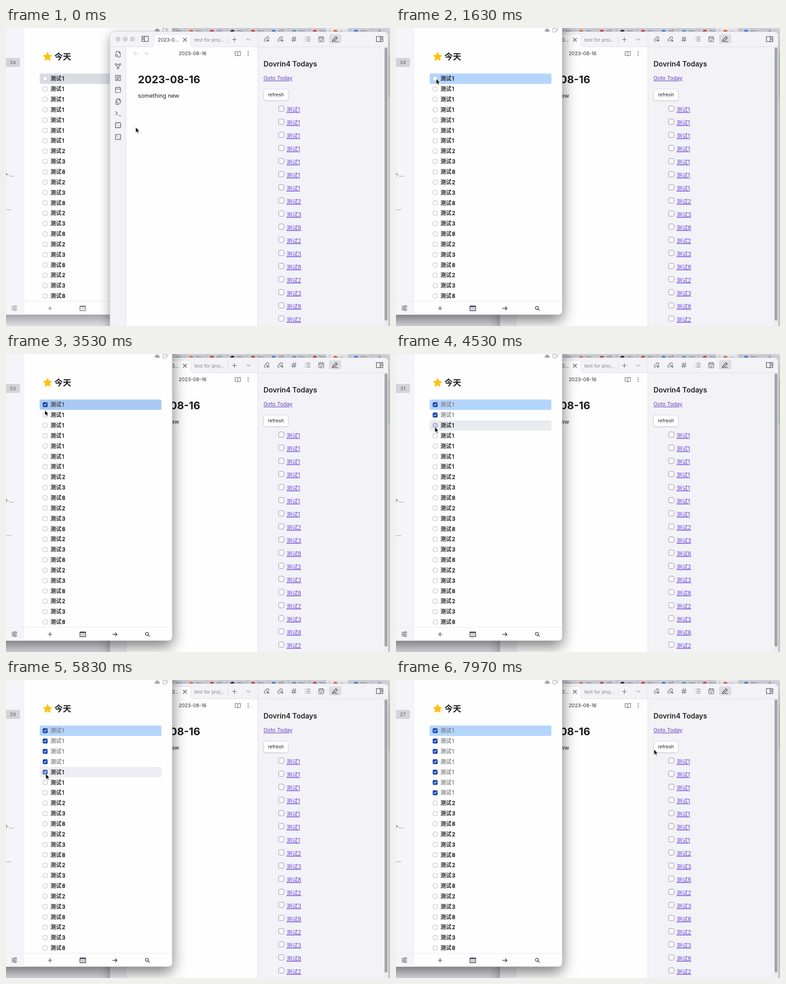
An HTML page that plays this animation: 850 px wide and 658 px high, repeating every 8 s.

```html
<!DOCTYPE html>
<html lang="zh">
<head>
<meta charset="utf-8">
<title>Todo sync</title>
<style>
html, body { margin: 0; width: 100%; height: 100%; overflow: hidden; background: #e3e3ea; }
svg { display: block; width: 850px; height: 658px; font-family: Inter, "Noto Sans CJK SC", "Noto Sans CJK", sans-serif; }
.icon { fill: none; stroke-linecap: round; stroke-linejoin: round; }
#notes .frame { filter: drop-shadow(0 7px 12px rgba(0,0,0,.34)); }
#tasks .frame { filter: drop-shadow(0 9px 12px rgba(0,0,0,.36)); }
#tasks.front .frame { filter: drop-shadow(0 12px 16px rgba(0,0,0,.52)); }
#tasks .tools { color: #77777c; }
#tasks.front .tools { color: #34344a; }
.label { stroke: currentColor; stroke-width: .3px; }
</style>
</head>
<body>
<svg viewBox="0 0 850 658">
  <g id="desktop"></g>
  <g id="windows"><g id="tasks"></g><g id="notes"></g></g>
  <path id="cursor" d="M0 0V12.2L2.8 9.6 4.7 14 6.7 13.1 4.8 8.9H8.6Z" fill="#111" stroke="#fff" stroke-width=".8"/>
</svg>
<script>
const LOOP = 8000, ACTIVATE = 1150;
const $ = id => document.getElementById(id);
const clamp = v => Math.max(0, Math.min(1, v));

const rect = (x, y, w, h, fill, r = 0, extra = '') =>
  `<rect x="${x}" y="${y}" width="${w}" height="${h}" rx="${r}" fill="${fill}" ${extra}/>`;
const text = (x, y, size, s, fill = '#222', weight = 400, extra = '') =>
  `<text x="${x}" y="${y}" font-size="${size}" fill="${fill}" font-weight="${weight}" ${extra}>${s}</text>`;
// Icons are drawn in a 24-unit box centred on (x, y).
const icon = (x, y, d, size = 15, color = '#5c5c62', width = 1.8) =>
  `<path class="icon" d="${d}" stroke="${color}" stroke-width="${width}" transform="translate(${x - size / 2} ${y - size / 2}) scale(${size / 24})"/>`;
const line = (x1, y1, x2, y2, color = '#dedee6') =>
  `<path d="M${x1} ${y1}L${x2} ${y2}" stroke="${color}"/>`;

const I = {
  plus: 'M12 4V20M4 12H20',
  close: 'M5 5L19 19M19 5L5 19',
  chevron: 'M5 9L12 16 19 9',
  left: 'M21 12H3M10 5L3 12 10 19',
  right: 'M3 12H21M14 5L21 12 14 19',
  search: 'M16 10A6 6 0 1 1 4 10A6 6 0 1 1 16 10M15 15L21 21',
  panelLeft: 'M3 4H21Q22 4 22 5V19Q22 20 21 20H3Q2 20 2 19V5Q2 4 3 4M10 4V20M5 8H7M5 11H7M5 14H7',
  panelRight: 'M3 4H21Q22 4 22 5V19Q22 20 21 20H3Q2 20 2 19V5Q2 4 3 4M14 4V20M17 8H19M17 11H19M17 14H19',
  file: 'M5 9V4Q5 2 7 2H15L20 7V20Q20 22 18 22H13M15 2V7H20M10 16A3.5 3.5 0 1 1 3 16A3.5 3.5 0 1 1 10 16M9 19L12 22',
  branch: 'M8 6A3 3 0 1 1 2 6A3 3 0 1 1 8 6M22 6A3 3 0 1 1 16 6A3 3 0 1 1 22 6M15 19A3 3 0 1 1 9 19A3 3 0 1 1 15 19M6 9L11 16M18 9L13 16M8 6H16',
  grid: 'M3 3H10V12H3ZM14 3H21V8H14ZM14 12H21V21H14ZM3 16H10V21H3Z',
  calendar: 'M5 4H19Q21 4 21 6V20Q21 22 19 22H5Q3 22 3 20V6Q3 4 5 4M3 10H21M8 2V6M16 2V6',
  copy: 'M9 2H16L21 7V16Q21 17 20 17H9Q8 17 8 16V3Q8 2 9 2M15 2V8H21M4 7V21Q4 22 5 22H16',
  prompt: 'M3 5L10 12 3 18M13 20H22',
  dice: 'M5 3H19Q21 3 21 5V19Q21 21 19 21H5Q3 21 3 19V5Q3 3 5 3M8 8h.1M12 12h.1M16 16h.1',
  book: 'M12 6Q10 4 2 4V19Q10 19 12 21 14 19 22 19V4Q14 4 12 6V20',
  dots: 'M12 4v.2M12 12v.2M12 20v.2',
  linkIn: 'M9 15A5 5 0 0 0 16 14L19 11A5 5 0 0 0 12 4L10 6M13 9A5 5 0 0 0 7 10L4 13A5 5 0 0 0 8 21M22 18H14M17 15L14 18 17 21',
  linkOut: 'M9 15A5 5 0 0 0 16 14L19 11A5 5 0 0 0 12 4L10 6M13 9A5 5 0 0 0 7 10L4 13A5 5 0 0 0 8 21M14 18H22M19 15L22 18 19 21',
  hash: 'M4 9H21M3 16H20M10 2L7 22M17 2L14 22',
  list: 'M8 5H22M8 12H22M8 19H22M2 5h.2M2 12h.2M2 19h.2',
  pencil: 'M12 21H22M16 3L21 8 8 20 3 21 4 16Z',
  sliders: 'M2 5H13M19 5H22M2 12H5M11 12H22M2 19H12M18 19H22M19 5A3 3 0 1 1 13 5A3 3 0 1 1 19 5M11 12A3 3 0 1 1 5 12A3 3 0 1 1 11 12M18 19A3 3 0 1 1 12 19A3 3 0 1 1 18 19',
  dates: 'M3 3H21Q23 3 23 5V20Q23 21 22 21H2Q1 21 1 20V5Q1 3 3 3M1 6H23M6 12h.2M10 12h.2M14 12h.2M18 12h.2M6 16h.2M10 16h.2M14 16h.2M18 16h.2',
  tick: 'M5 12L10 17 19 6'
};

const digits = n => Array.from({ length: n }, (_, i) => i < 7 ? 1 : [2, 3, 8][(i - 7) % 3]);
const rowY = i => 112 + 22.85 * i;

function drawDesktop() {
  const dots = ['#e8793c', '#d93a30', '#222', '#d93a30', '#3b82d6', '#5d9fc4', '#d93a30', '#e8632c', '#3478e0'];
  let s = rect(0, 0, 850, 658, '#e3e3ea') + rect(368, 0, 482, 12, '#d7d7e2') + rect(709, 0, 48, 12, '#f2f2f6');
  s += text(376, 11, 10, 'inv', '#77777f');
  dots.forEach((c, i) => {
    const x = 410 + 45.6 * i;
    s += `<circle cx="${x}" cy="9" r="5" fill="${c}"/>` + line(x - 13, 1, x - 13, 8, '#b9b9c3')
      + text(x + 10, 11, 10, i === 7 ? '×' : ['inv', 'gif', 'my'][i % 3], '#77777f');
  });
  s += line(810, 1, 810, 8, '#b9b9c3') + icon(827, 8, I.plus, 13, '#444');
  $('desktop').innerHTML = s + rect(846, 57, 4, 97, '#c5ddd5');
}

function drawNotes() {
  const shell = 'M230 720V18Q230 8 240 8H836Q846 8 846 18V720Z';
  let s = `<path class="frame" d="${shell}" fill="#f2f2f7" stroke="#c9c9d0" stroke-width=".7"/>`;
  s += rect(266, 42, 291, 618, '#fefefe') + line(230, 41.5, 846, 41.5) + line(265.5, 42, 265.5, 658, '#dcdcf0')
    + line(557.5, 8, 557.5, 658);
  for (const x of [248, 264, 280]) s += `<circle cx="${x}" cy="24.5" r="5" fill="#d3d3d6" stroke="#bfbfc4" stroke-width=".7"/>`;
  s += icon(308, 24, I.panelLeft, 17, '#4c4c52');
  s += `<path d="M323 42Q328 42 328 37V19Q328 14 333 14H404Q409 14 409 19V37Q409 42 414 42Z" fill="#fefefe" stroke="#dedee6" stroke-width=".8"/>`
    + rect(324, 41, 89, 3, '#fefefe');
  s += text(336, 30, 10.5, '2023-0...', '#333') + icon(396, 26, I.close, 12, '#333', 2.4)
    + text(417, 30, 10.5, 'test for proj...', '#888') + line(491.5, 18, 491.5, 34, '#d0d0d6')
    + icon(505.5, 25.5, I.plus, 14) + icon(536.5, 25, I.chevron, 13);

  [I.file, I.branch, I.grid, I.calendar, I.copy, I.prompt, I.dice, I.dice]
    .forEach((d, i) => s += icon(248, 58 + 26.1 * i, d, 15, '#55555b', d === I.dice ? 2.2 : 1.8));
  s += icon(287.5, 56, I.left, 12, '#b9b9be') + icon(310, 56, I.right, 12, '#b9b9be')
    + text(413, 60, 10.9, '2023-08-16', '#333', 400, 'text-anchor="middle"')
    + icon(513, 56.5, I.book, 14) + icon(536, 56.5, I.dots, 12, '#44444a', 4);
  s += text(292, 121.7, 23.3, '2023-08-16', '#1b1b1d', 700) + text(292, 153.5, 12.7, 'something new');

  s += rect(715, 14, 27, 20, '#dcdce3', 4);
  [I.linkIn, I.linkOut, I.hash, I.list, I.calendar + 'M8 16L11 19 16 14', I.pencil]
    .forEach((d, i) => s += icon(577 + 30.2 * i, 24.5, d, 14.5, i === 5 ? '#222' : '#5c5c62'));
  s += icon(827, 24.5, I.panelRight, 17, '#4c4c52');

  const link = 'text-decoration="underline"', purple = '#7047d8';
  s += text(570, 85, 15.6, 'Dovrin4 Todays', '#222', 600) + text(570, 115.3, 11.8, 'Goto Today', '#6840bd', 400, link);
  s += rect(570.5, 135, 54, 25, '#fff', 4, 'stroke="#d5d5dd" style="filter:drop-shadow(0 1px 1px rgba(0,0,0,.12))"')
    + text(597.5, 151.3, 10.5, 'refresh', '#222', 400, 'text-anchor="middle"');
  digits(17).forEach((digit, i) => {
    const y = 180 + 28.97 * i;
    s += rect(603.5, y - 8, 12, 12, '#f8f8fc', 3, 'stroke="#8d8d98"') + text(621, y + 5, 12.4, '测试' + digit, purple, 400, link);
  });
  s += rect(837, 42, 9, 616, '#ececf1') + rect(838, 43, 6.5, 603, '#a5a5a9', 3);
  $('notes').innerHTML = s;
}

function drawTasks() {
  const shell = 'M-60 -40H368V624Q368 633 359 633H-60Z';
  let s = `<path class="frame" d="${shell}" fill="#fefefe" stroke="#b9b9c0" stroke-width=".7"/>` + rect(-1, 0, 42, 633, '#f4f4f9');
  s += rect(-4, 66, 35, 20, '#d3d3d9', 4) + text(15, 80, 11, '', '#74747a', 500, 'id="count" text-anchor="middle"');
  s += text(-5, 328, 12, '卜...', '#444') + text(1, 402, 12, '...', '#444');
  s += `<path d="M92 54L94.8 60 101 60.7 96.4 65 97.7 71.2 92 68.1 86.3 71.2 87.6 65 83 60.7 89.2 60Z" fill="#ffc10a" stroke="#ffc10a" stroke-width="1.6" stroke-linejoin="round"/>`
    + text(107, 70, 18.7, '今天', '#1f2226', 700);
  s += `<path d="M331 8.5a3 3 0 0 1 0-5.5a4 4 0 0 1 7 0a3 3 0 0 1 1 5.5z" fill="#a9a9b2"/>`
    + rect(350, -3, 8, 9, 'none', 2, 'stroke="#9a9aa2"') + rect(347, 1, 8, 8, '#fefefe', 2, 'stroke="#9a9aa2"');
  s += rect(74.5, 100.5, 269.5, 23, '#dadce4', 3.5, 'id="selected"');
  digits(22).forEach((digit, i) => {
    const y = rowY(i);
    s += `<g class="row">` + rect(74.5, y - 11.3, 269.5, 22.6, '#33337a', 3.5, 'class="press" opacity="0"')
      + rect(82, y - 4.8, 9.4, 9.4, '#fff', 2.5, 'class="box" stroke="#b3b3bb"')
      + `<g class="check" opacity="0">` + rect(81.3, y - 5.5, 10.8, 10.8, '#1747ac', 2.5) + icon(86.7, y, I.tick, 9, '#fff', 3.2) + `</g>`
      + text(98.5, y + 4.3, 12, `测试<tspan dx="1.2">${digit}</tspan>`, 'currentColor', 500, 'class="label" color="#18181b"') + `</g>`;
  });
  s += line(0, 603.5, 368, 603.5, '#eaeaee') + `<g class="tools">` + icon(18.5, 618.5, I.sliders, 14, 'currentColor', 1.6)
    + icon(97.5, 619, I.plus, 13, 'currentColor', 2.2) + icon(170, 619, I.dates, 14, 'currentColor', 2.2)
    + icon(241, 619, I.right, 13, 'currentColor', 2.4) + icon(313, 619, I.search, 13, 'currentColor', 2.6) + `</g>`;
  $('tasks').innerHTML = s;
}

drawDesktop();
drawNotes();
drawTasks();

const presses = [3360, 3850, 4430, 5080, 5690, 6270, 6850];
const path = [
  [0, 287, 219], [250, 287, 219], [1150, 89, 112], [3390, 89, 112], [3530, 86, 124], [3720, 86, 137],
  [4080, 86, 137], [4360, 86, 161], [4580, 86, 161], [4880, 87, 184], [5220, 87, 184], [5600, 88, 207],
  [5860, 88, 207], [6160, 87, 228], [6420, 87, 228], [6570, 87, 241], [6740, 87, 251], [7520, 87, 251],
  [7960, 571, 153], [LOOP, 571, 153]
];
const rows = presses.map((_, i) => {
  const row = document.querySelectorAll('.row')[i];
  return Object.fromEntries(['press', 'box', 'check', 'label'].map(k => [k, row.querySelector('.' + k)]));
});

function cursorAt(t) {
  const i = path.findIndex(p => p[0] > t);
  const [t0, x0, y0] = path[i - 1], [t1, x1, y1] = path[i];
  const u = (t - t0) / (t1 - t0), e = u * u * (3 - 2 * u);
  return [x0 + (x1 - x0) * e, y0 + (y1 - y0) * e];
}

function render(t) {
  const front = t >= ACTIVATE, top = front ? $('tasks') : $('notes');
  if ($('windows').lastElementChild !== top) $('windows').append(top);
  $('tasks').classList.toggle('front', front);
  $('selected').setAttribute('fill', front ? '#b3d5fc' : '#dadce4');
  $('count').textContent = 34 - presses.filter(p => t >= p + 70).length;

  rows.forEach((row, i) => {
    const dt = t - presses[i];
    const press = dt < 0 ? 0 : clamp(dt / 50) * clamp(1 - (dt - 100) / 240);
    const grey = Math.round(24 + 104 * clamp((dt - 130) / 110));
    row.press.setAttribute('opacity', press * 0.1);
    row.box.setAttribute('fill', press > 0 ? '#cfd3ea' : '#fff');
    row.box.setAttribute('stroke', press > 0 ? '#7d86a8' : '#b3b3bb');
    row.check.setAttribute('opacity', clamp((dt - 100) / 60));
    row.label.setAttribute('color', `rgb(${grey},${grey},${grey + 3})`);
  });
  $('cursor').setAttribute('transform', `translate(${cursorAt(t)})`);
}

const start = performance.now();
function tick() {
  render((performance.now() - start) % LOOP);
  requestAnimationFrame(tick);
}
tick();
</script>
</body>
</html>
```
